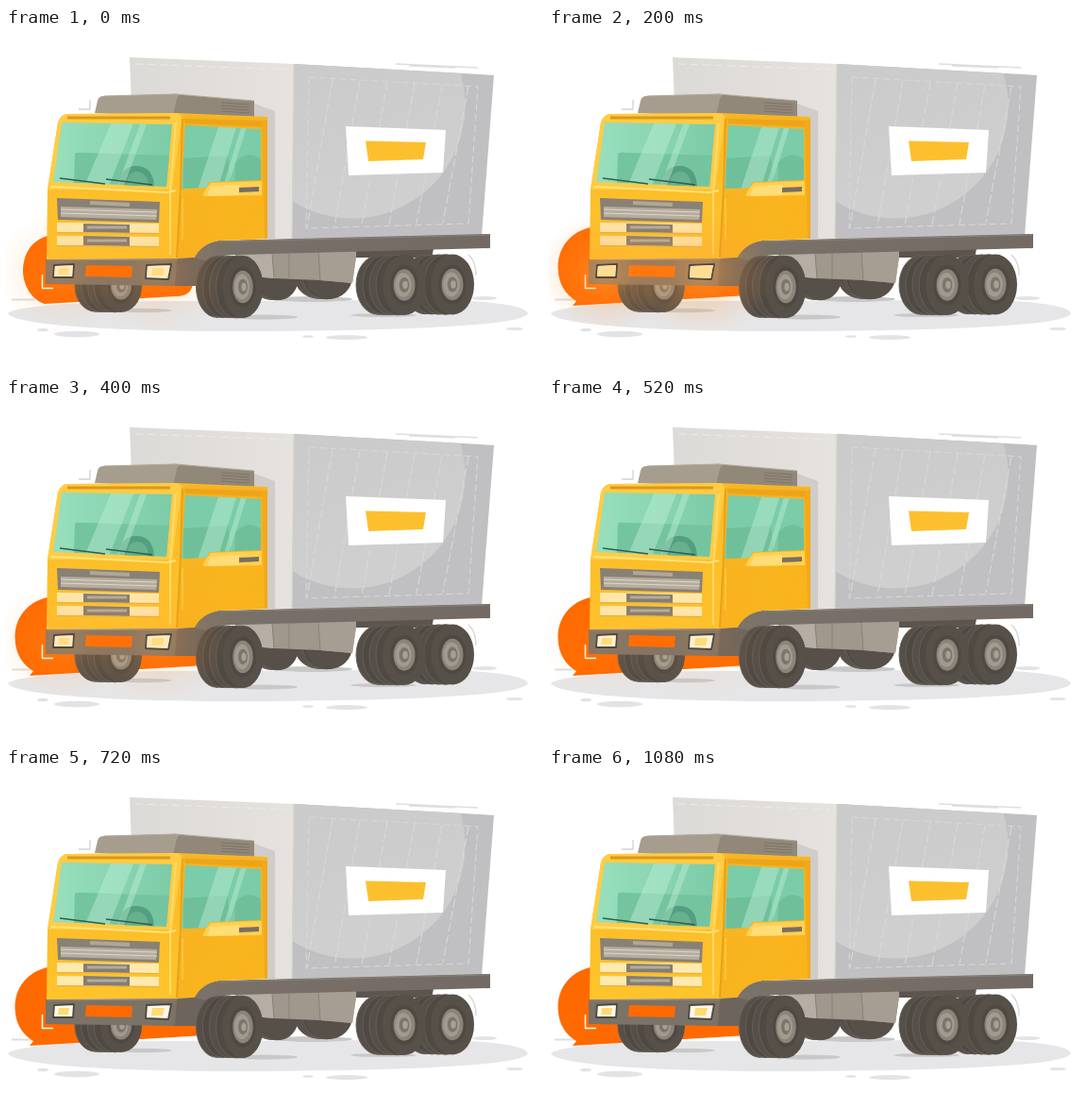
An HTML page that plays this animation: 569x362 px, repeating every 1.12 s.

```html
<!DOCTYPE html>
<html lang="en">
<head>
<meta charset="utf-8">
<title>Truck</title>
<style>
html, body { margin: 0; width: 100%; height: 100%; overflow: hidden; background: #fff; }
svg { display: block; width: 569px; height: 362px; }
</style>
</head>
<body>
<svg viewBox="0 0 569 362" fill="none" stroke-linejoin="round">
  <defs>
    <linearGradient id="front" x1="0" x2="1"><stop stop-color="#dcdad7"/><stop offset="1" stop-color="#e6e2dd"/></linearGradient>
    <linearGradient id="side" x1="0" y1="0" x2=".3" y2="1"><stop stop-color="#c9c8c9"/><stop offset="1" stop-color="#cfcfd0"/></linearGradient>
    <linearGradient id="cab" x1="0" y1="0" x2="0" y2="1"><stop stop-color="#f9b928"/><stop offset="1" stop-color="#ffc42b"/></linearGradient>
    <linearGradient id="door" x1="0" y1="0" x2="1" y2="1"><stop stop-color="#f7b322"/><stop offset="1" stop-color="#fab51c"/></linearGradient>
    <linearGradient id="glass" x1="0" x2="1"><stop stop-color="#98dfbd"/><stop offset="1" stop-color="#7dcba7"/></linearGradient>
    <linearGradient id="bed" x1="0" x2="1"><stop stop-color="#7b736a"/><stop offset="1" stop-color="#726a63"/></linearGradient>
    <radialGradient id="halo"><stop stop-color="#ffa63e" stop-opacity=".55"/><stop offset=".45" stop-color="#ff9a38" stop-opacity=".24"/><stop offset="1" stop-color="#ff9a38" stop-opacity="0"/></radialGradient>
    <clipPath id="sideClip"><path d="M305 38 517 50 504 220 303 223Z"/></clipPath>
    <clipPath id="screenClip"><path d="M59 100 176 102 170 168 50 163Z"/></clipPath>
    <clipPath id="windowClip"><path d="M190 103 270 107V161L216 163 212 169 186 170Z"/></clipPath>
  </defs>

  <g id="ground">
    <path d="M2 302C12 294 70 290 170 289L420 288C500 287 550 292 553 302C548 315 430 320 278 321C110 322 7 314 2 302Z" fill="#e6e6e8"/>
    <g fill="#e3e3e5">
      <ellipse cx="75" cy="324" rx="24" ry="3.2"/><ellipse cx="39" cy="319.500" rx="6" ry="1.700"/>
      <ellipse cx="361" cy="327.500" rx="22" ry="2.600"/><ellipse cx="320" cy="326.500" rx="6" ry="1.300"/>
      <ellipse cx="539" cy="318.500" rx="9" ry="1.600"/><ellipse cx="507" cy="286" rx="13" ry="2"/>
    </g>
    <g fill="#c9c8c9">
      <ellipse cx="145" cy="299" rx="31" ry="2.200"/><ellipse cx="272" cy="306" rx="37" ry="2.400"/>
      <ellipse cx="400" cy="304" rx="35" ry="2"/><ellipse cx="325" cy="287" rx="42" ry="3"/>
    </g>
    <path d="M6 287.500H31" stroke="#dededf" stroke-width="2"/>
  </g>

  <path id="blob" fill="#ff6a00"/>
  <g stroke-width="1.300">
    <path d="M89 76V86H77" stroke="#d3d2d3"/>
    <path d="M413 38 500 42M427 40 476 42" stroke="#dededf"/>
    <path d="M490 240Q498 247 498 262" stroke="#d6d5d5"/>
  </g>

  <g id="box">
    <path d="M131 31 305 38 303 223H270V94L133 82Z" fill="url(#front)"/>
    <path d="M263 80 285 88V223H277V96L263 94Z" fill="#cfccc9"/>
    <path d="M137 38 298 44" stroke="#eeebe7" stroke-dasharray="8 5"/>
    <path d="M305 38 517 50 504 220 303 223Z" fill="#c0c0c2"/>
    <g clip-path="url(#sideClip)">
      <circle cx="367" cy="82" r="119.500" fill="url(#side)"/>
      <g id="seams" stroke="#dadadb" stroke-width="1" stroke-dasharray="9 4"/>
      <path d="M321 52 500 62 490 207 318 212Z" stroke="#d8d8d9" stroke-dasharray="7 4"/>
    </g>
    <path d="M305 38 303 223" stroke="#d5d3d2"/>
    <path d="M360 104 466 108 463 153 363 156Z" fill="#fff"/>
    <path d="M381 119.500 445 121 442 139 384 141Z" fill="#fcc02f"/>
  </g>

  <g id="farWheels"></g>
  <path d="M242 239 372 235 367 270 333 267 284 265 262 263Z" fill="#a0988c"/>
  <path d="M250 240 282 239 284 265 262 263Z" fill="#b6aea4"/>
  <path d="M331 237 372 235 367 270 333 267Z" fill="#a69e92"/>
  <path d="M282 239 284 265M300 239V265M331 237 333 267" stroke="#878077"/>
  <path d="M371 234H453L451 243H371Z" fill="#5c554f"/>
  <g id="rearWheels"></g>
  <path d="M198 244Q207 227 225 225L513 218V233L245 240Q220 240 212 251L209 272H180Z" fill="url(#bed)"/>
  <path d="M227 226 512 219" stroke="#8b827a"/>

  <g id="leftWheel"></g>
  <g id="roof">
    <path d="M94 90 97 77Q98 72 104 72L174 70Q183 69 191 72L178 94Z" fill="#a69d8e"/>
    <path d="M177 92 181 75Q183 69 190 71L263 77V95Z" fill="#918879"/>
    <path d="M104 72 180 70 262 77" stroke="#b4ab9c"/>
    <path d="M228 79 258 81M228 82 258 84M228 85 258 87M228 88 258 90" stroke="#7d7468"/>
  </g>

  <g id="cabin">
    <path d="M43 245 44 171 55 100Q58 91 66 91L181 90 277 94V223L226 225Q207 228 199 244Z" fill="url(#cab)"/>
    <path d="M181 244 186 165 188 96Q189 92 195 92L277 95V223L226 225Q207 228 199 244Z" fill="url(#door)"/>
    <path d="M44 171 55 100Q58 91 66 91L181 90Q187 91 186 98L176 171Z" fill="#ffcc43"/>
    <path d="M65 95H174" stroke="#dc981b" stroke-width="3"/>
    <path d="M189 96 277 98V105L190 101Z" fill="#eca51b"/>
    <path d="M271 98H277V223H274Z" fill="#f2a91b"/>
    <path d="M180 100 174 173V240" stroke="#ffda65" stroke-width="2"/>
    <path d="M48 168 170 174 180 172" stroke="#ffe17c" stroke-width="2"/>
    <path d="M187 96 185 170 181 243" stroke="#e7a11a" stroke-width="2"/>
    <path d="M59 100 176 102 170 168 50 163Z" fill="url(#glass)"/>
    <g clip-path="url(#screenClip)">
      <path d="M73 133Q75 131 82 132L173 135V168L72 164Z" fill="#75c4a0"/>
      <path d="M120 170Q120 145 139 146Q157 147 157 170Z" fill="#559f80"/>
      <path d="M127 170Q128 152 139 152Q151 153 151 170Z" fill="#66b28f"/>
      <path d="M112 99H136L108 170H82ZM143 99H150L124 170H117Z" fill="#c1f0d8" opacity=".42"/>
    </g>
    <path d="M57 159 105 165M106 160 155 166" stroke="#315c4d" stroke-width="1.500"/>
    <path d="M190 103 270 107V161L216 163 212 169 186 170Z" fill="#7bcca8"/>
    <g clip-path="url(#windowClip)">
      <path d="M188 138 235 135 239 170H188ZM243 143Q254 128 270 139V170H242Z" fill="#64b38f" opacity=".5"/>
      <path d="M226 102H245L224 171H203ZM250 102H256L234 171H229Z" fill="#bdedd5" opacity=".45"/>
    </g>
    <path d="M186 170H212L217 164 271 162V177L211 178Z" fill="#ffd052"/>
    <path d="M186 170H212L208 178H185Z" fill="#f8b523"/>
    <path d="M217 168 247 166V177L213 178Z" fill="#ffdd76"/>
    <path d="M247 169 268 168V173L247 174Z" fill="#786e62"/>
    <path d="M187 180V224" stroke="#ffd35a"/>
  </g>

  <g id="grille">
    <path d="M54 180 163 184 162 206 55 203Z" fill="#898175"/>
    <path d="M58 189 160 192 159 203 58 200Z" fill="#b5ad9f"/>
    <path d="M58 192 160 195M58 196 160 199" stroke="#ddd7ca"/>
    <path d="M89 183 131 185V189L89 187Z" fill="#b0a797"/>
    <path d="M54 206 162 207V217L54 216ZM54 220 162 221V231L54 230Z" fill="#ffe9ae"/>
    <path d="M82 207 131 208V217L82 216ZM82 220 131 221V231L82 230Z" fill="#857d71"/>
    <path d="M86 211H128M86 225H128" stroke="#b4ab9d" stroke-width="3"/>
    <path d="M54 216.500 162 217.500M54 230.500 162 231.500" stroke="#deb04a"/>
  </g>

  <path d="M42 245 181 244 199 243 212 248 209 273 180 273 42 271Z" fill="#7b7268"/>
  <path d="M181 245 199 243 212 246 209 273 179 273Z" fill="#6c645d"/>
  <path d="M43 246 182 245" stroke="#958a7e"/>
  <path d="M85 251 134 252 133 264 84 263Z" fill="#ff6a00"/>
  <path d="M38.500 261V275.500H50" stroke="#fff" stroke-width="1.500"/>
  <g id="nearWheel"></g>

  <g id="glow">
    <ellipse cx="61" cy="258" rx="72" ry="62" fill="url(#halo)"/>
    <ellipse cx="161" cy="258" rx="78" ry="66" fill="url(#halo)"/>
  </g>
  <g id="lamps" stroke="#4f4841" stroke-width="1.800" fill="#fff9e8">
    <path d="M51 251 72 250 71 264 50 264Z"/>
    <path d="M149 251 175 250 172 266 148 265Z"/>
  </g>
  <g fill="#ffdb72">
    <path d="M56 254H67L66 261H55Z"/><path d="M155 254H168L166 262H154Z"/>
  </g>
  <g id="lit" fill="#ffdd94">
    <path d="M52 252 71 251 70 263 51 263Z"/>
    <path d="M150 252 174 251 171 265 149 264Z"/>
  </g>
</svg>
<script>
const LOOP = 1120, STEP = 40;
const $ = s => document.querySelector(s);
const ellipse = (x, y, rx, ry, fill, more = "") =>
  `<ellipse cx="${x}" cy="${y}" rx="${rx}" ry="${ry}" fill="${fill}" ${more}/>`;

function wheel(x, y, rx, ry, depth, hub = true) {
  let s = `<rect x="${x - depth}" y="${y - ry + .5}" width="${depth}" height="${ry * 2 - 1}" fill="#504a44"/>`;
  for (let i = 4; i > 0; i--) {
    s += ellipse(x - depth * i / 4, y, rx, ry - i * .2, i % 2 ? "#4f4943" : "#554f49", 'stroke="#665e56"');
  }
  s += ellipse(x, y, rx, ry, "#565049");
  if (!hub) return s;
  return s + ellipse(x, y, rx * .64, ry * .66, "#4f4943")
    + ellipse(x, y, rx * .5, ry * .52, "#8b847a")
    + ellipse(x - 1, y, rx * .38, ry * .4, "#a19a8f")
    + ellipse(x, y, rx * .23, ry * .25, "#7c756b")
    + ellipse(x + 1, y, rx * .12, ry * .13, "#a8a094");
}

$("#farWheels").innerHTML = wheel(342, 263, 25, 24, 11, false) + wheel(289, 264, 21, 24, 9, false);
$("#leftWheel").innerHTML = wheel(122, 273, 22, 28, 27);
$("#rearWheels").innerHTML = wheel(473, 271.5, 23, 32, 29) + wheel(422, 272, 23, 32, 28);
$("#nearWheel").innerHTML = wheel(251, 274, 21.5, 33, 28);

$("#seams").innerHTML = [346, 375, 404, 433, 462, 490]
  .map((x, i) => `<path d="M${x} ${54 + i * 1.6} ${x - 27} ${211 - i}"/>`).join("");

const blobs = [
  "M44 220C27 225 18 239 18 258C19 276 29 288 41 292L180 284Q196 284 198 271L198 250H44Z",
  "M44 211C22 216 9.500 233 9.500 253C9.500 270 17 282 29 289L25 294 211 283V250H44Z"
];

// Time and strength of the headlight flash
const flash = [[0, .5], [200, 1], [400, .55], [520, .25], [640, 0], [LOOP, 0]];

function strength(t) {
  const i = flash.findIndex(key => key[0] > t);
  const [t0, a] = flash[i - 1], [t1, b] = flash[i];
  return a + (b - a) * (t - t0) / (t1 - t0);
}

function draw(now) {
  const t = Math.floor(now % LOOP / STEP) * STEP;
  const power = strength(t);
  $("#blob").setAttribute("d", blobs[t < STEP ? 0 : 1]);
  $("#glow").setAttribute("opacity", power);
  $("#lit").setAttribute("opacity", power);
}

const start = performance.now();
function tick() {
  draw(performance.now() - start);
  requestAnimationFrame(tick);
}
tick();
</script>
</body>
</html>
```
